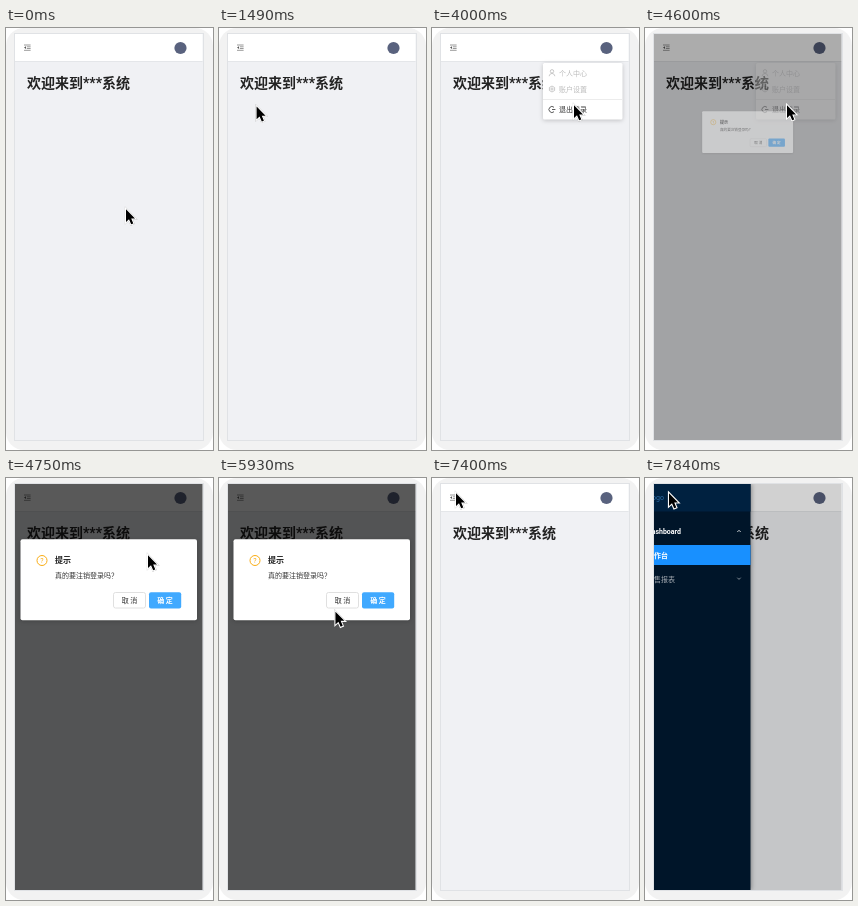
These frames come from a looping animation (207 px wide and 422 px high, 7990 ms). An HTML page:

```html
<!DOCTYPE html>
<html lang="zh-CN">
<head>
<meta charset="utf-8">
<style>
  html, body { margin: 0; width: 100%; height: 100%; overflow: hidden; background: #fff; }
  svg { display: block; width: 207px; height: 422px; }
  text { font: 7px Roboto, "Noto Sans CJK SC", "Noto Sans CJK", sans-serif; fill: #333; }
  .bold { font-weight: 700; }
  .title { font-size: 14px; fill: #222; }
  .off text { fill: #bbb; }
  .line { fill: none; stroke: #333; stroke-width: .8; }
  .off .line { stroke: #bbb; }
  .fold { fill: none; stroke: #555; stroke-width: .6; }
  .mid { text-anchor: middle; }
  .end { text-anchor: end; }
  #menu, #dialog { filter: drop-shadow(0 1px 2px #0003); }
  #side { filter: drop-shadow(1px 0 2px #0005); }
  #cursor { filter: drop-shadow(0 .7px .7px #0007); }
</style>
</head>
<body>
<svg viewBox="0 0 207 422">
  <clipPath id="screen"><path d="M9 6H196.5V412H9Z"/></clipPath>
  <rect width="207" height="422" rx="18" fill="#f2f2f2"/>
  <rect x="8.5" y="5.5" width="189" height="407" fill="#f0f1f4" stroke="#e0e2e5"/>

  <g clip-path="url(#screen)">
    <path d="M9 6H197V33H9Z" fill="#fff"/>
    <path d="M9 33.5H197" stroke="#e4e6e9"/>
    <path class="fold" d="M18 17H24.6M20.8 18.8H24.6M20.8 20.5H24.6M18 22.3H24.6"/>
    <path d="M20 18.3V21L18 19.6Z" fill="#555"/>
    <circle cx="174.5" cy="20" r="6.1" fill="#59627e"/>
    <text class="title bold" x="21" y="60.2">欢迎来到***系统</text>

    <g id="menu">
      <rect x="111" y="35" width="79.5" height="56.5" rx="1.5" fill="#fff"/>
      <g class="off">
        <circle class="line" cx="120" cy="43.3" r="1.7"/>
        <path class="line" d="M117.2 48.2C117.4 44.6 122.6 44.6 122.8 48.2"/>
        <text x="127" y="47.7">个人中心</text>
        <path class="line" d="M120 58L122.6 59.5V62.5L120 64L117.4 62.5V59.5Z"/>
        <circle class="line" cx="120" cy="61" r="1.1"/>
        <text x="127" y="63.7">账户设置</text>
      </g>
      <path d="M111 71.5H190" stroke="#e8e8e8" stroke-width=".8"/>
      <path class="line" d="M122 79.3A3 3 0 1 0 122 83.7M120 81.5H123.4"/>
      <text x="127" y="84.2">退出登录</text>
    </g>

    <path id="mask" d="M9 6H197V412H9Z"/>

    <g id="side">
      <path d="M9 6H105.5V412H9Z" fill="#001529"/>
      <path d="M9 6H105.5V33.5H9Z" fill="#002140"/>
      <text class="end" x="19" y="22.3" style="fill:#2a6ba6">Logo</text>
      <text class="end bold" x="36" y="55.6" style="fill:#fff">Dashboard</text>
      <path class="line" d="M92.3 54L94 52.3L95.7 54" style="stroke:#fff"/>
      <path d="M9 67H105.5V87H9Z" fill="#1890ff"/>
      <text class="end bold" x="23" y="79.6" style="fill:#fff">工作台</text>
      <text class="end" x="30" y="103.6" style="fill:#a6adb4">销售报表</text>
      <path class="line" d="M92.3 99.7L94 101.4L95.7 99.7" style="stroke:#a6adb4"/>
    </g>
  </g>

  <g id="dialog">
    <rect x="14.5" y="61.3" width="176.5" height="81" rx="2" fill="#fff"/>
    <circle class="line" cx="36" cy="82.5" r="5" style="stroke:#faad14;stroke-width:1"/>
    <text class="mid" x="36" y="85.1" style="fill:#faad14">?</text>
    <text class="bold" x="49" y="85.4" style="font-size:8px;fill:#222">提示</text>
    <text x="49" y="100.3">真的要注销登录吗？</text>
    <rect x="107.5" y="114.5" width="32" height="15.5" rx="2" fill="#fff" stroke="#d9d9d9" stroke-width=".8"/>
    <text class="mid" x="123.5" y="124.8">取 消</text>
    <rect x="143" y="114.2" width="32.2" height="16.2" rx="2" fill="#40a9ff"/>
    <text class="mid bold" x="159" y="124.8" style="fill:#fff">确 定</text>
  </g>

  <path id="cursor" d="M1 1.3V14L4 11.3L6.2 16.3L8.3 15.4L6.2 10.4H10Z"
    stroke="#fff" stroke-width="2.2" paint-order="stroke"/>
</svg>
<script>
const LOOP = 7990, STEP = LOOP / 54 - .06;
const $ = id => document.getElementById(id);

// Pointer moves in steps of the clock, each along a Bézier curve
const moves = [
  { from: 8, to: 13, path: [[119, 180], [20, 80], [4, 10], [17, 15]] },
  { from: 14, to: 18, path: [[17, 15], [100, 46], [168, 25]] },
  { from: 25, to: 27, path: [[168, 25], [141, 76]] },
  { from: 34, to: 41, path: [[141, 76], [140, 5], [110, 175], [116, 122]] },
  { from: 45, to: 50, path: [[116, 122], [23, 14]] },
];

const ramp = (n, from, to) => Math.min(Math.max((n - from) / (to - from), 0), 1);

function bezier(points, p) {
  if (points.length === 1) return points[0];
  const inner = points.slice(1).map((b, i) => b.map((v, k) => points[i][k] * (1 - p) + v * p));
  return bezier(inner, p);
}

function draw(now) {
  const n = Math.floor(now % LOOP / STEP);
  const menu = ramp(n, 21, 23) - ramp(n, 30, 32);
  const open = ramp(n, 30, 32) - ramp(n, 42, 44);
  const side = ramp(n, 52, 53);
  const move = moves.findLast(m => m.from <= n) || moves[0];

  $('menu').style.opacity = menu;
  $('mask').style.opacity = .65 * open + .18 * side;
  $('side').style.opacity = side;
  $('dialog').style.opacity = open ** 1.2;
  $('dialog').setAttribute('transform',
    `translate(102.5 106.6) scale(${.03 + .97 * open}) translate(-102.5 -106.6)`);
  $('cursor').setAttribute('transform',
    `translate(${bezier(move.path, ramp(n, move.from, move.to))})`);
  requestAnimationFrame(draw);
}
draw(performance.now());
</script>
</body>
</html>
```
